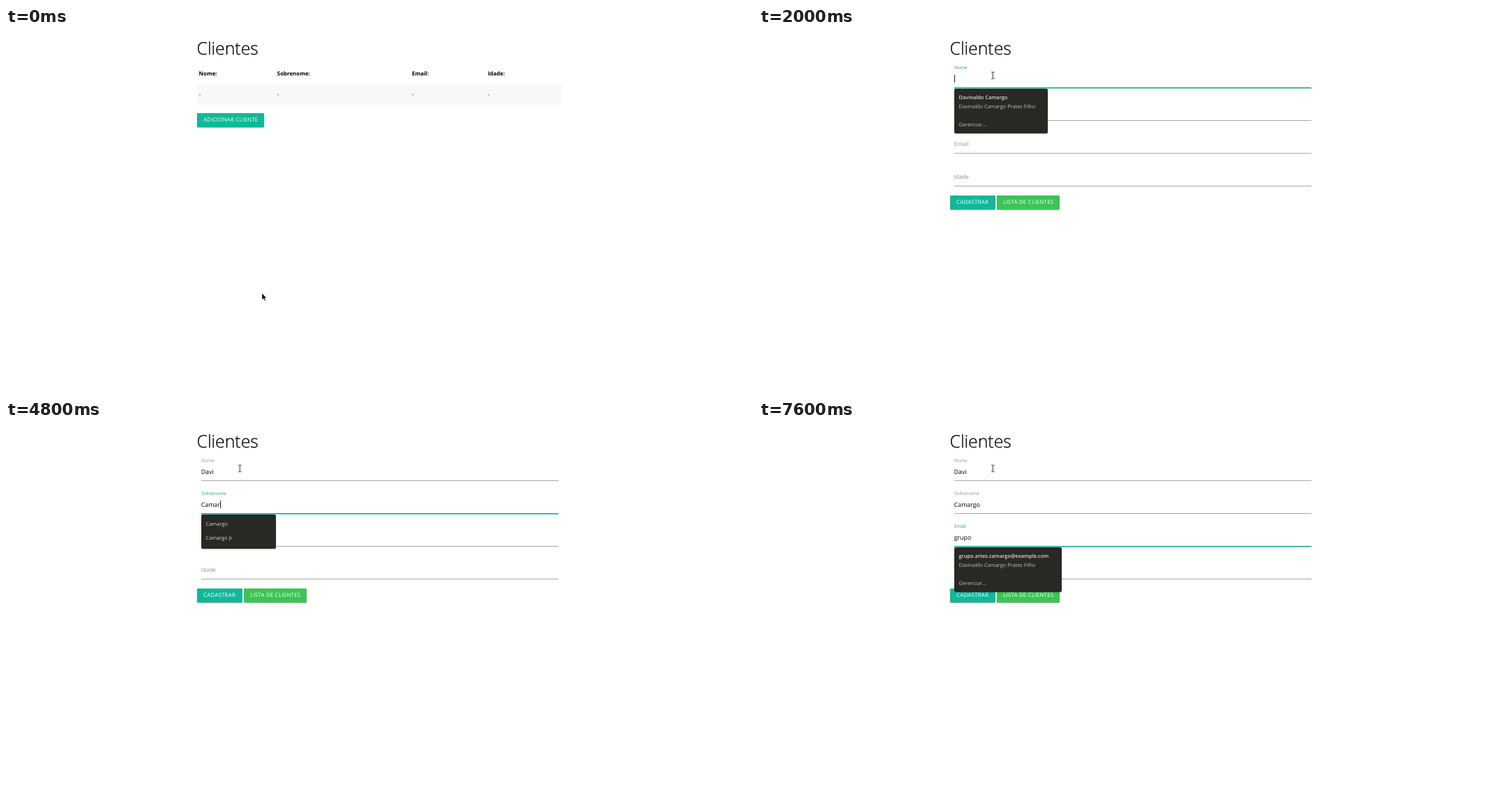
Animation of 1071x523 px, one loop 8000 ms. Source, as an HTML page:

```html
<!DOCTYPE html>
<html lang="pt-BR">
<head>
<meta charset="utf-8">
<title>Clientes</title>
<style>
html, body { margin: 0; width: 100%; height: 100%; overflow: hidden; background: #fffffd; }
body { position: relative; font: 8.1px "Open Sans", "Noto Sans", sans-serif; color: #000; text-rendering: geometricPrecision; }
div, p, svg, i { position: absolute; margin: 0; }
svg { overflow: visible; left: 0; top: 0; width: 1px; height: 1px; }
.page { inset: 0; }
/* text, vertically centred on --y */
.t { left: calc(var(--x) * 1px); top: calc(var(--y) * 1px - 10px); line-height: 20px; white-space: pre; }
h1.t { position: absolute; margin: 0; font-size: 24.8px; font-weight: 300; -webkit-text-stroke: .25px #000; }
.th { font-size: 7.9px; font-weight: 700; }
.row { left: 274px; top: 81px; width: 523px; height: 29px; background: #f8f8f6; }
.btn { height: 20px; line-height: 20px; padding-left: 9px; box-sizing: border-box; border-radius: 1px;
  color: #fff; font-size: 7.8px; letter-spacing: .28px; white-space: pre;
  box-shadow: 0 1px 1.5px rgba(0,0,0,.26), 0 1.5px 1px -1px rgba(0,0,0,.12); }
.label { transform-origin: 0 50%; }
.value { font-size: 8.8px; }
.value i { width: 1px; height: 11px; top: 4.5px; background: #222; }
.line, .glow { left: 280px; width: 511.5px; height: 1px; }
.line { background: #a8a8a5; }
.glow { background: #1ba598; }
.popup { left: 280px; background: #282825; border-radius: 2px; box-shadow: 0 1px 2px rgba(0,0,0,.25); font-size: 7.4px; color: #bdbdb8; }
.popup b { font-weight: 600; color: #dcdcd7; }
.popup .sep { left: 0; right: 0; top: 39.5px; height: 1px; background: #2f2f2c; }
#status { left: 0; top: 514px; width: 107px; height: 9px; background: #f0f0ee; border-radius: 0 2px 0 0; overflow: hidden; }
#status p { font-size: 7.4px; color: #555; }
</style>
</head>
<body>
<h1 class="t" style="--x:273.5;--y:28.7">Clientes</h1>

<div class="page" id="list">
  <p class="t th" style="--x:276.6;--y:66.3">Nome:</p>
  <p class="t th" style="--x:388.8;--y:66.3">Sobrenome:</p>
  <p class="t th" style="--x:582;--y:66.3">Email:</p>
  <p class="t th" style="--x:690.9;--y:66.3">Idade:</p>
  <div class="row"></div>
  <p class="t" style="--x:276.7;--y:95.5">-</p>
  <p class="t" style="--x:388.9;--y:95.5">-</p>
  <p class="t" style="--x:582.3;--y:95.5">-</p>
  <p class="t" style="--x:691;--y:95.5">-</p>
  <div class="btn" id="add" style="left:274px;top:122px;width:96px;line-height:21px">ADICIONAR CLIENTE</div>
</div>

<div class="page" id="form">
  <div class="btn" id="save" style="left:274px;top:240px;width:65px">CADASTRAR</div>
  <div class="btn" id="back" style="left:341px;top:240px;width:90px">LISTA DE CLIENTES</div>
</div>

<div class="popup" style="top:86.5px;width:134px;height:64px">
  <p class="t" style="--x:6.5;--y:13.5"><b>Davinaldo Camargo</b></p>
  <p class="t" style="--x:6.5;--y:26.5">Davinaldo Camargo Prates Filho</p>
  <div class="sep"></div>
  <p class="t" style="--x:6.5;--y:52.5">Gerenciar...</p>
</div>
<div class="popup" style="top:133.5px;width:107px;height:49px;color:#d4d4cf">
  <p class="t" style="--x:6.5;--y:14">Camargo</p>
  <p class="t" style="--x:6.5;--y:34">Camargo Jr</p>
</div>
<div class="popup" style="top:180.5px;width:154px;height:64px">
  <p class="t" style="--x:6.5;--y:13.5"><b>grupo.artes.camargo@example.com</b></p>
  <p class="t" style="--x:6.5;--y:26.5">Davinaldo Camargo Prates Filho</p>
  <div class="sep"></div>
  <p class="t" style="--x:6.5;--y:52.5">Gerenciar...</p>
</div>

<div id="status"><p class="t" style="--x:2.5;--y:5">localhost:3000/adicionar</p></div>

<svg id="pointer">
  <path id="arrow" d="M0 0V9.6L2.2 7.6L3.9 11L5.3 10.4L3.7 7H6.6Z" fill="#000" stroke="#fff" stroke-width=".5"/>
  <path id="hand" d="M-1 0.6Q0 -.6 1 .6V4L4.6 4.8Q5.6 5.2 5.4 6.5L4.6 10.5H-.6L-3.4 6.6Q-3.4 5.4 -2.2 5.8L-1 6.8Z" fill="#000" stroke="#fff" stroke-width=".6"/>
  <path id="beam" d="M-2.2 -4.8H-.6L0 -4.3L.6 -4.8H2.2M0 -4.3V4.3M-2.2 4.8H-.6L0 4.3L.6 4.8H2.2" fill="none" stroke="#333" stroke-width="1"/>
</svg>

<script>
const LOOP = 8000, STEP = 100, OPENED = 1200;
const $ = id => document.getElementById(id);
const ramp = (t, start, dur) => Math.min(1, Math.max(0, (t - start) / dur));
const smooth = p => p * p * (3 - 2 * p);
const easeOut = p => 1 - (1 - p) ** 2;
const lerp = (a, b, p) => a + (b - a) * p;
const mix = (a, b, p) => `rgb(${a.map((v, i) => Math.round(lerp(v, b[i], p)))})`;
const show = (el, on) => { el.style.visibility = on ? 'visible' : 'hidden'; };

const GREY = [142, 142, 140], TEAL = [20, 160, 147];
const MINT = [17, 184, 152], MINT_DARK = [14, 162, 137];
const LIME = [60, 196, 86], LIME_DARK = [53, 168, 78];
const NEVER = 1e9;

// focus/blur times, key press times and spans in which the caret is lit
const fields = [
  { label: 'Nome', focus: 1700, blur: 3300, text: 'Davi',
    keys: [2700, 2900, 3000, 3100], caret: [[1800, 2300], [2700, 3400]] },
  { label: 'Sobrenome', focus: 3300, blur: 5400, text: 'Camargo',
    keys: [4300, 4400, 4500, 4600, 4800, 5100, 5300], caret: [[3400, 5500]] },
  { label: 'Email', focus: 5400, blur: NEVER, text: 'grupo',
    keys: [6600, 6700, 6800, 7000, 7000], caret: [[5500, 5900], [6600, 7600]] },
  { label: 'Idade', focus: NEVER, blur: NEVER, text: '', keys: [], caret: [] }
];
const popups = [...document.querySelectorAll('.popup')];
const popupTimes = [[1800, 3300], [4400, 5400], [6600, NEVER]];

function add(tag, cls, css, parent = $('form')) {
  const el = document.createElement(tag);
  el.className = cls;
  el.style.cssText = css;
  return parent.appendChild(el);
}

fields.forEach((f, i) => {
  const y = 73 + 47 * i;
  add('div', 'line', `top:${y + 12}px`);
  f.glow = add('div', 'glow', `top:${y + 12}px`);
  f.name = add('p', 't label', `--x:279.7;--y:${y}`);
  f.name.textContent = f.label;
  const value = add('p', 't value', `--x:279.7;--y:${y - .3}`);
  f.typed = add('span', '', '', value);
  f.bar = add('i', '', '', value);
});

function drawField(f, t) {
  const up = easeOut(ramp(t, f.focus, 250));
  const on = Math.min(up, 1 - ramp(t, f.blur, 300));
  f.name.style.transform = `translateY(${-15.5 * up}px) scale(${1 - .19 * up})`;
  f.name.style.color = mix(GREY, TEAL, on);
  f.glow.style.opacity = on;
  f.glow.style.boxShadow = `0 1px 0 rgba(27,165,152,${.6 * on * on})`;
  f.typed.textContent = f.text.slice(0, f.keys.filter(k => k <= t).length);
  show(f.bar, f.caret.some(([a, b]) => t >= a && t < b));
}

function drawPointer(t) {
  const travel = smooth(ramp(t, 300, 700));
  const x = lerp(367 + ramp(t, 0, 200), 335.3, travel);
  const y = lerp(lerp(380, 136.3, travel), 68, smooth(ramp(t, 1300, 400)));
  const over = t < OPENED && y < 143;
  const inField = t > OPENED && (y < 86 || (y > 109 && y < 133));
  $('pointer').style.transform = `translate(${x}px, ${y}px)`;
  show($('hand'), over);
  show($('beam'), inField);
  show($('arrow'), !over && !inField);
  return over;
}

function draw(t) {
  const open = t >= OPENED;
  $('list').style.display = open ? 'none' : 'block';
  // display also hides children whose own visibility is set
  $('form').style.display = open ? 'block' : 'none';

  const over = drawPointer(t);
  $('add').style.background = mix(MINT, MINT_DARK, over ? 1 : 0);
  const settle = ramp(t, 1300, 300);
  $('save').style.background = mix(MINT_DARK, MINT, settle);
  $('back').style.background = mix(LIME_DARK, LIME, settle);

  show($('status'), t >= 1100 && t < 1500);
  $('status').style.opacity = 1 - ramp(t, 1300, 200);
  $('status').firstChild.style.opacity = 1 - .88 * ramp(t, 1200, 100);

  fields.forEach(f => drawField(f, t));
  popups.forEach((p, i) => {
    const [start, end] = popupTimes[i];
    const a = Math.min(ramp(t, start, 200), 1 - ramp(t, end, 300));
    p.style.opacity = a;
    p.style.transform = a < 1 ? `scale(${.955 + .045 * a})` : 'none';
  });
}

const begin = performance.now();
function tick() {
  const t = (performance.now() - begin) % LOOP;
  draw(Math.floor(t / STEP) * STEP);
  requestAnimationFrame(tick);
}
tick();
</script>
</body>
</html>
```
